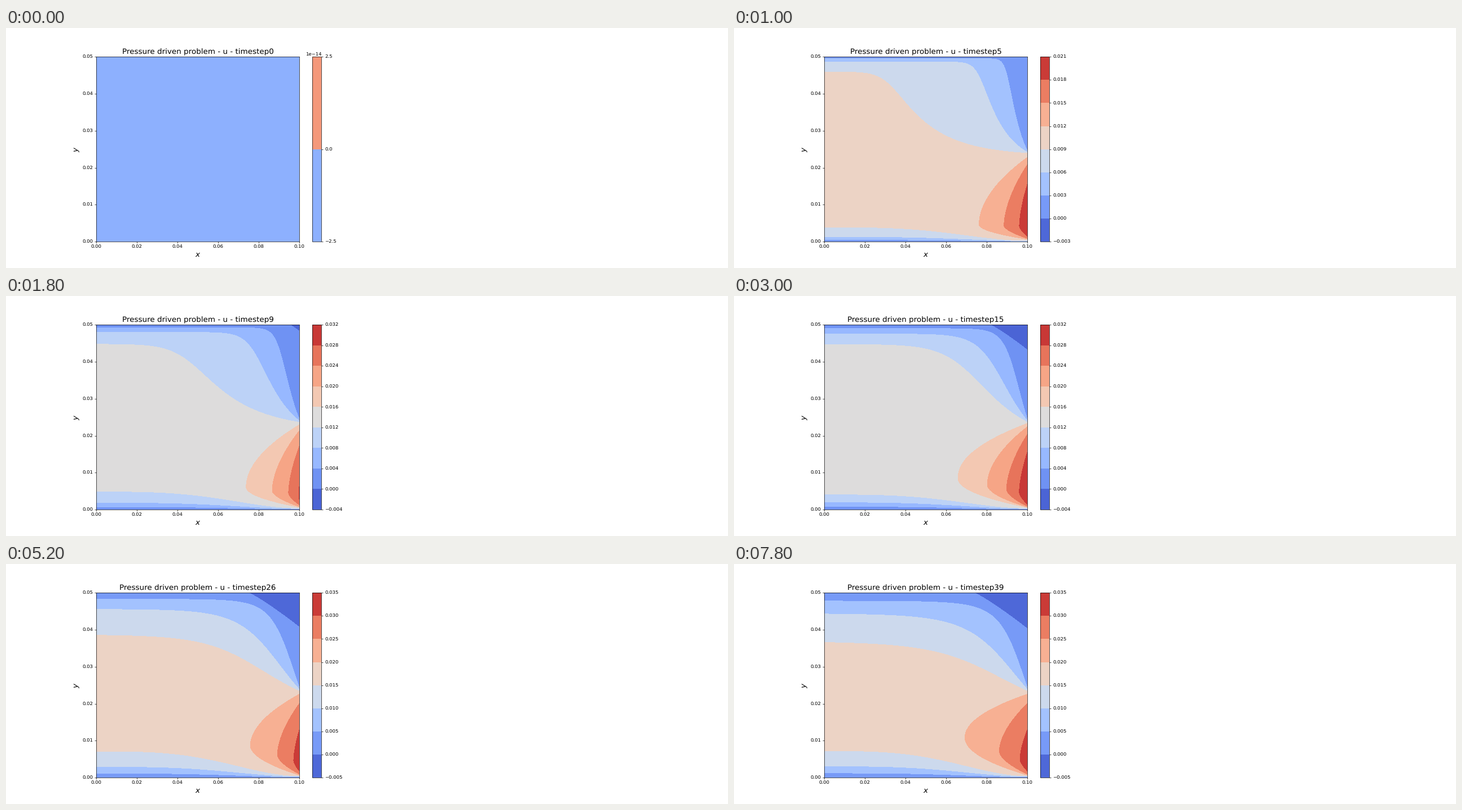
A matplotlib script that plays this animation: 1280 px wide and 427 px high, repeating every 8 s.

```python
import numpy as np
import matplotlib.pyplot as plt
from matplotlib.animation import FuncAnimation
from matplotlib.contour import ContourSet

WIDTH, HEIGHT = 1280, 427
DPI = WIDTH / 21
STEPS = 40

plt.rcParams["text.hinting"] = "none"
fig = plt.figure(figsize=(WIDTH / DPI, HEIGHT / DPI), dpi=DPI)

# The channel is 100 mm long and 50 mm high; the outlet is its lower right half.
x = np.linspace(0, 100, 301)
CHANNEL = np.array([(0, 0), (100, 0), (100, 50), (0, 50)])


def settle(t, start, tau):
    """Rise from 0 to 1 that begins at a given time."""
    return 1 - np.exp(-max(t - start, 0) / tau)


def fade(t, start, width):
    return np.exp(-(max(t - start, 0) / width) ** 2)


def growth(t):
    return np.tanh(t / 6.8)


def peak(t):
    """Highest velocity at the outlet."""
    return .0327 * growth(t)


def core(t):
    """Velocity of the undisturbed flow at the inlet."""
    return .0152 * growth(t) + .0022 * settle(t, 20, 6)


def between(bottom, top):
    return np.vstack([np.column_stack([x, bottom]),
                      np.column_stack([x, top])[::-1]])


def forward_region(t):
    """Everything but the backflow in the upper right corner."""
    size = settle(t, 7.8, 6)
    s = np.clip((x - 100 + 26.5 * size) / (26.5 * size + 1e-9), 0, 1)
    return between(0 * x, 50 - 9.8 * size * s ** 1.15)


def stream_region(level, t):
    """Flow faster than a level below the core velocity."""
    lean = .0012 * np.exp(-((t - 20) / 6) ** 2)
    inlet = -3.7 * settle(t, 0, 11) * np.log(1 - level / (core(t) + lean))
    outlet = .05 + 30 * level
    bend = .5 + .5 * np.cos(np.pi * (x / 100) ** 1.6)
    bottom = outlet + (inlet - outlet) * bend

    # The top wall layer meets the flow turning down towards the outlet.
    q = level / core(t)
    end = 24.7 - 90 * level
    rise = 50 + .42 * t ** .75 * np.log(1 - q) - end
    reach = (32 + .25 * t) * q + 52 * q ** 6 * fade(t, 5, 9)
    k = (1.6 + .16 * t) * np.sqrt(reach)
    turn = np.expm1((100 - x) / k) / np.expm1(reach / k)
    n = 1.85 + 2.6 * np.exp(-(t - 5) / 5)
    return between(bottom, end + rise * turn / (1 + turn ** n) ** (1 / n))


def jet_region(level, t):
    """Fast flow bulging inwards from the outlet."""
    r = 1 - level / peak(t)
    near = np.exp(-r / .15)
    low, high = .5 + 2.2 * near, 24 - 19 * near
    depth = (8 + .19 * max(t - 20, 0)) * np.expm1(r / .3)
    tip = 4.2 + .235 * settle(t, 4, 14) * depth
    v = np.linspace(-1, 1, 161)
    y = tip + v * np.where(v > 0, high - tip, tip - low)
    return np.column_stack([100 - depth * (1 - abs(v) ** (1.5 + depth / 60)), y])


def region(level, t):
    if t == 0:
        return CHANNEL * 0
    if level == 0:
        return forward_region(t)
    if level < core(t):
        return stream_region(level, t)
    return jet_region(level, t)


def contour_levels(t):
    """At most eight round steps up to the peak, and one below zero."""
    if t == 0:
        return np.array([-2.5e-14, 0, 2.5e-14])
    raw = peak(t) / 8
    unit = 10 ** np.floor(np.log10(raw))
    nice = (1, 1.5, 2, 2.5, 3, 4, 5, 6, 8, 10)
    step = unit * next(k for k in nice if k * unit >= raw)
    return np.arange(-1, np.ceil(peak(t) / step) + 1) * step


def add_box(left, width):
    bottom, top = .11, .88
    return fig.add_axes([left / WIDTH, bottom, width / WIDTH, top - bottom])


def draw(t):
    fig.clf()
    ax, bar = add_box(160, 360.3), add_box(543.3, 16)
    levels = contour_levels(t)
    areas = [CHANNEL] + [region(level, t) for level in levels[1:-1]]
    bands = ContourSet(ax, levels, [[a / 1000] for a in areas],
                       filled=True, cmap="coolwarm")
    fig.colorbar(bands, cax=bar)
    ax.set(xlim=(0, .1), ylim=(0, .05))
    ax.set_title(f"Pressure driven problem - u - timestep{t}", fontsize=16)
    ax.set_xlabel("$x$", fontsize=16)
    ax.set_ylabel("$y$", fontsize=16)
    return []


anim = FuncAnimation(fig, draw, frames=STEPS, interval=200, repeat=True,
                     init_func=lambda: draw(0))
plt.show()
```
